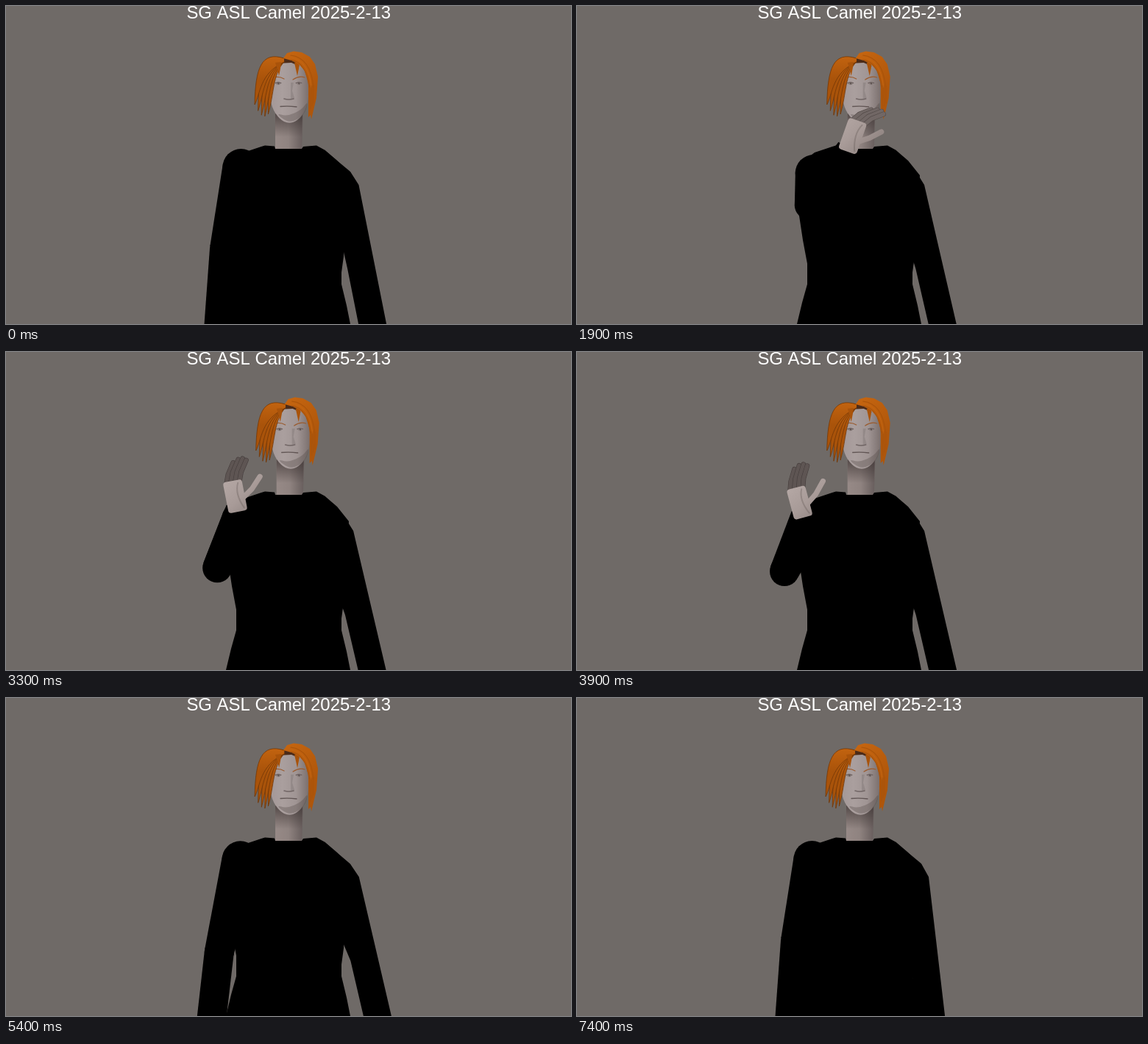
An HTML page with a canvas that plays this animation: 768x432 px, repeating every 7500 ms.

```html
<!DOCTYPE html>
<html lang="en">
<head>
<meta charset="utf-8">
<title>SG ASL Camel</title>
<style>
html, body { margin: 0; width: 100%; height: 100%; overflow: hidden; background: #6f6a67; }
canvas { display: block; width: 768px; height: 432px; }
</style>
</head>
<body>
<canvas id="stage" width="768" height="432"></canvas>
<script>
const ctx = document.getElementById('stage').getContext('2d');
const LOOP = 7500, STEP = 100, RAD = Math.PI / 180;

// elbow and wrist of the signing arm, hem of the other arm, shoulder drop,
// then the hand: heading, finger bend, palm length, shade on the fingers
const rest = { ex: 297, ey: 330, wx: 289, wy: 440, hem: 517, drop: 0, turn: -270, bend: 0, palm: 26, shade: 0 };
const hang = { ...rest, ex: 290, ey: 345, wx: 279, hem: 524 };
const low = { ex: 285, ey: 348, wx: 286, wy: 358, hem: 518, drop: 1, turn: -168, bend: -76, palm: 26, shade: 0 };
const across = { ex: 318, ey: 278, wx: 405, wy: 269, hem: 505, drop: 1, turn: -41, bend: 38, palm: 32, shade: 0 };
const face = { ex: 315, ey: 268, wx: 357, wy: 170, hem: 519, drop: 1, turn: -80, bend: 42, palm: 38, shade: 1 };
const aside = { ex: 282, ey: 298, wx: 307, wy: 221, hem: 516, drop: 1, turn: -105, bend: 26, palm: 34, shade: 1 };
const swing = { ...low, hem: 530 };
const tucked = { ...rest, hem: 500 };

const TIMELINE = [
  [0, rest], [450, swing], [900, across], [1050, across], [2300, face], [2700, face],
  [3500, aside], [3900, aside], [4650, low], [5500, hang], [6100, hang], [7000, tucked], [LOOP, tucked]
];
const isBlink = t => [2700, 4700].some(m => Math.abs(t - m) < 150);

const mix = (a, b, k) => a + (b - a) * k;
const mixPt = (p, q, k) => [mix(p[0], q[0], k), mix(p[1], q[1], k)];
const polar = ([x, y], deg, r) => [x + r * Math.cos(deg * RAD), y + r * Math.sin(deg * RAD)];

function poseAt(t) {
  const i = TIMELINE.findIndex(([end]) => end > t);
  const [t0, a] = TIMELINE[i - 1], [t1, b] = TIMELINE[i];
  const u = (t - t0) / (t1 - t0), k = u * u * (3 - 2 * u), pose = {};
  for (const key in a) pose[key] = mix(a[key], b[key], k);
  return pose;
}

function trace(pts, close) {
  ctx.beginPath();
  pts.forEach(([x, y]) => ctx.lineTo(x, y));
  if (close) ctx.closePath();
}
function poly(color, ...pts) {
  trace(pts, true);
  ctx.fillStyle = color;
  ctx.fill();
}
function line(color, width, ...pts) {
  trace(pts);
  ctx.strokeStyle = color;
  ctx.lineWidth = width;
  ctx.stroke();
}
function blob(color, ...pts) {
  const n = pts.length, half = i => mixPt(pts[i % n], pts[(i + 1) % n], 0.5);
  ctx.beginPath();
  ctx.moveTo(...half(n - 1));
  pts.forEach((p, i) => ctx.quadraticCurveTo(...p, ...half(i)));
  ctx.fillStyle = color;
  ctx.fill();
}
function curve(color, width, p, c, q) {
  ctx.beginPath();
  ctx.moveTo(...p);
  ctx.quadraticCurveTo(...c, ...q);
  ctx.strokeStyle = color;
  ctx.lineWidth = width;
  ctx.stroke();
}
function ramp(x0, y0, x1, y1, ...colors) {
  const g = ctx.createLinearGradient(x0, y0, x1, y1);
  colors.forEach((c, i) => g.addColorStop(i / (colors.length - 1), c));
  return g;
}

// Tapered limb, round at the start and cut flat at the end
function limb(x0, y0, r0, x1, y1, r1) {
  const a = Math.atan2(y1 - y0, x1 - x0) / RAD;
  ctx.beginPath();
  ctx.arc(x0, y0, r0, 0, 7);
  ctx.fillStyle = '#000';
  ctx.fill();
  poly('#000', polar([x0, y0], a + 90, r0), polar([x1, y1], a + 90, r1),
    polar([x1, y1], a - 90, r1), polar([x0, y0], a - 90, r0));
}

function drawFace(shut) {
  poly(ramp(365, 0, 403, 0, '#978a87', '#8f8380', '#685e5d'), [366, 138], [366, 197], [402, 197], [404, 138]);
  poly(ramp(0, 148, 0, 178, 'rgba(60,51,50,.7)', 'rgba(60,51,50,0)'),
    [366, 146], [366, 180], [402, 180], [403, 146]);
  blob(ramp(357, 0, 413, 0, '#a39797', '#aa9f9e', '#a09594', '#776c6a'),
    [358, 80], [357, 112], [361, 138], [372, 154], [384, 160], [396, 156],
    [407, 143], [412, 122], [413, 92], [400, 74], [372, 73]);
  blob('rgba(74,63,61,.3)', [366, 145], [382, 150], [402, 141], [411, 128], [406, 148], [385, 160]);

  poly('rgba(70,60,60,.16)', [387, 104], [391, 104], [389, 115], [392, 125], [387, 126]);
  curve('rgba(78,67,66,.6)', 1.6, [378, 126], [384, 128], [391, 126]);
  curve('rgba(85,73,72,.85)', 1.3, [373, 136.5], [384, 135.5], [395, 137]);
  for (const [x, tilt] of [[370, 1], [398, -1]]) {
    curve('#9a5c30', 1.2, [x - 8, 99 - tilt], [x, 94.5], [x + 8, 98 + tilt]);
    if (shut) continue;
    blob('#8e8381', [x - 5, 105], [x, 102], [x + 5, 105], [x, 108]);
    curve('#665a59', 1, [x - 4, 104.5], [x, 103], [x + 4, 104.5]);
    line('#5b504f', 1.8, [x, 105], [x + 0.5, 105.5]);
  }
}

function drawHair() {
  const dark = '#713607', mid = '#a9530a', lit = '#c56510';
  poly('#4c2b18', [370, 78], [378, 70], [394, 74], [399, 82], [388, 77]);

  // locks sweeping left from the parting
  for (let i = 4; i >= 0; i--) {
    const x = 339 + 4.6 * i, y = 134 + 16 * Math.sin(i * 0.55), top = 61 + 3.5 * i;
    ctx.beginPath();
    ctx.moveTo(378, 71);
    ctx.bezierCurveTo(347 + 2.5 * i, top, x, 84, x - 1, y);
    ctx.bezierCurveTo(x + 7, 120, x + 5, 92, 378, 76);
    ctx.fillStyle = ramp(0, 65, 0, y, lit, mid, mid);
    ctx.fill();
    ctx.strokeStyle = dark;
    ctx.lineWidth = 0.8;
    ctx.stroke();
  }
  // fringe
  for (const [x, lean] of [[371, -5], [396, -4]]) {
    poly(mid, [x + lean, 77], [x - 2, 86], [x, 95], [x + 2, 85], [x + 3, 76]);
  }
  // right side
  poly(ramp(385, 62, 423, 110, lit, '#b95d0d', '#ae560b'),
    [377, 71], [382, 64], [391, 61.5], [402, 63], [413, 69], [420, 79], [424, 96], [422, 125],
    [415, 154], [414, 148], [411, 151], [411, 105], [406, 88], [398, 79], [388, 74]);
  for (let i = 0; i < 3; i++) {
    curve(i % 2 ? lit : mid, 1.2, [387, 73 - 3 * i], [408 + 3 * i, 76 - 3 * i], [412 + 3 * i, 110]);
    line(mid, 1, [413 + 2.5 * i, 108], [414 + 2 * i, 140 - 4 * i]);
  }
}

function drawBody(hem, drop) {
  poly('#000', [347, 191], [352, 189.5], [365, 190.5], [366, 194], [402, 194], [404, 191],
    [422, 189.5], [433, 195.5], [450, 210], [466, 230], [459, 340], [456, 362],
    [456, 378], [463, 407], [468, 432], [299, 432], [306, 403], [313, 378], [313, 350],
    [307, 318], [302, 285], [303, 232], [307, 211], [323, 199]);

  const edge = y => {
    const k = (y - 225) / 207;
    return [478 + 0.117 * (y - 243) + (hem - 500) * k - 8 * drop * (1 - k), y];
  };
  const outer = [], inner = [];
  for (let y = 243; y <= 432; y += 27) outer.push(edge(y));
  for (let y = 432; y >= 355; y -= 25) inner.push([edge(y)[0] - 38, y]);
  poly('#000', [433, 195.5], [450 - drop, 210 + drop], [468 - 4 * drop, 225 + 5 * drop],
    ...outer, ...inner, [459 - 2 * drop, 334 + 12 * drop], [440, 290]);
}

function drawHand({ wx, wy, turn, bend, palm, shade }) {
  const wrist = [wx, wy], knuckle = polar(wrist, turn, palm);
  const tone = (a, b) => `rgb(${a.map((v, i) => Math.round(mix(v, b[i], shade)))})`;
  const skin = ramp(wx - 30, wy - 35, wx + 20, wy + 20, '#b7aaa7', '#a89b98', '#8b7f7c');
  const finger = tone([172, 160, 157], [94, 85, 83]), rim = tone([118, 106, 104], [70, 62, 61]);
  const heel = polar(wrist, turn - 90, 9), ball = polar(wrist, turn + 90, 9);
  const across = k => polar(knuckle, turn + 90, mix(-9, 9, k));

  const digit = (base, heading, curl, length, color, border, width) => {
    const joint = polar(base, heading, length * 0.45);
    const tip = polar(joint, heading + curl, length * 0.55);
    line(border, width + 1.2, base, joint, tip);
    line(color, width, base, joint, tip);
  };
  for (let n = 0; n < 4; n++) {
    const length = 32 + 4 * Math.sin(n * 1.05);
    digit(across(n / 3), turn + bend * 0.75, bend * 0.45, length, finger, rim, 5.5);
  }

  trace([heel, across(0), across(1), ball], true);
  ctx.fillStyle = ctx.strokeStyle = skin;
  ctx.lineWidth = 8;
  ctx.fill();
  ctx.stroke();
  const root = polar(mixPt(wrist, knuckle, 0.4), turn + 90, 11);
  const spread = mix(bend, 48, shade);
  digit(root, turn + spread + 8 * shade, -12 * shade, mix(22, 36, shade), skin, skin, 6);
  curve('rgba(90,78,76,.3)', 2, across(0.9), mixPt(wrist, knuckle, 0.6), ball);
}

function draw(t) {
  const pose = poseAt(t), { ex, ey, wx, wy, hem, drop } = pose;
  ctx.fillStyle = '#6f6a67';
  ctx.fillRect(0, 0, 768, 432);
  ctx.lineCap = ctx.lineJoin = 'round';
  ctx.fillStyle = '#fff';
  ctx.font = '23.9px "Liberation Sans", Arial, sans-serif';
  ctx.textAlign = 'center';
  ctx.fillText('SG ASL Camel 2025-2-13', 384.2, 16.8);

  ctx.save();
  ctx.translate(1.7 * drop, 0);
  drawFace(isBlink(t));
  drawHair();
  ctx.restore();

  drawBody(hem, drop);
  limb(318 + (ex - 285) * 0.12, 219 + 8 * drop, 25, ex, ey, 20);
  limb(ex, ey, 20, wx, wy, 20 - 4 * drop);
  if (wy < 430) drawHand(pose);
}

function tick(now) {
  draw(Math.floor(now % LOOP / STEP) * STEP);
  requestAnimationFrame(tick);
}
draw(0);
requestAnimationFrame(tick);
</script>
</body>
</html>
```
